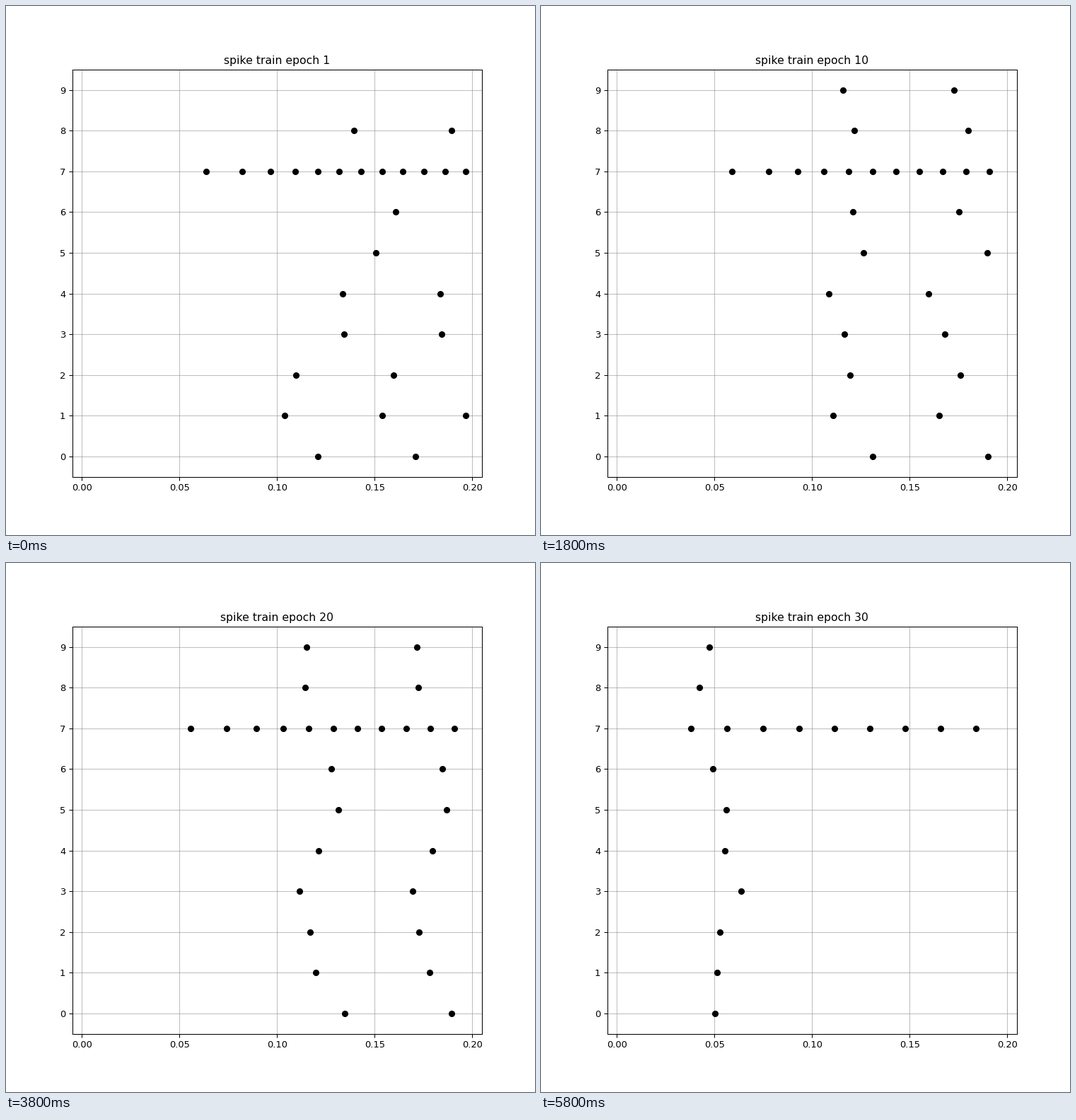
Recreate the animation shown at these times as a matplotlib script. Size 748x748 px, loop 6000 ms.

```python
import numpy as np
import matplotlib.pyplot as plt
from matplotlib.animation import FuncAnimation

EPOCHS = 30
T_MAX = 200  # end of the simulated window, ms
ROWS = np.array([0, 1, 2, 3, 4, 5, 6, 8, 9])
BURST_ROW = 7

# Phases of learning: settle quickly, drift, collapse, drift.
KEYS = [1, 7, 22, 26, 30]
START = [63.5, 59.5, 55.4, 39.8, 37.8]
PITCH = [10.75, 11.9, 12.4, 16.1, 18.1]
LAG = [15, 12.4, 11.4, 1.8, 1.2]
GAP = [50, 57, 57, 160, 160]
SPREAD = [0, 7, 7, 2, 3]

# First spikes of the quiet neurons, in ms, per phase.
OPENING = np.array([121, 104, 109.6, 134.3, 133.4, 150.6, 160.7, 139.4, 205])
MIDDLE = np.full(len(ROWS), 121)
CLOSING = np.array([50.5, 54.5, 51, 64, 54.5, 56.5, 51.5, 45, 48])
FIRST = [OPENING, MIDDLE, MIDDLE, CLOSING, CLOSING]

rng = np.random.default_rng(7)
jitter = rng.normal(size=(EPOCHS, 2, len(ROWS))).clip(-2, 2)


def eased(values, epoch):
    k = min(np.searchsorted(KEYS, epoch, side="right"), len(KEYS) - 1)
    u = (epoch - KEYS[k - 1]) / (KEYS[k] - KEYS[k - 1])
    return values[k - 1] + (values[k] - values[k - 1]) * u * u * (3 - 2 * u)


def burst(epoch):
    """Intervals shrink from the first one towards a steady pitch."""
    i = np.arange(14)
    lag = eased(LAG, epoch) * (1 - np.exp(-i / 1.3))
    return eased(START, epoch) + eased(PITCH, epoch) * i + lag


def quiet(epoch):
    """Up to three spikes per neuron; the second interval is shorter."""
    shift, stretch = jitter[epoch - 1] * eased(SPREAD, epoch)
    first = eased(FIRST, epoch) + shift
    gap = eased(GAP, epoch) + 0.7 * stretch
    return np.concatenate([first + gap * k for k in (0, 1, 1.85)])


def spikes(epoch):
    run, others = burst(epoch), quiet(epoch)
    t = np.concatenate([run, others])
    row = np.concatenate([np.full(len(run), BURST_ROW), np.tile(ROWS, 3)])
    seen = t < T_MAX
    return t[seen] / 1000, row[seen]


fig, ax = plt.subplots(figsize=(8, 8), dpi=93.5)
ax.set_xlim(-0.005, 0.205)
ax.set_ylim(-0.5, 9.5)
ax.set_xticks(np.arange(5) * 0.05)
ax.set_yticks(range(10))
ax.xaxis.set_major_formatter("{x:.2f}")
ax.grid(color="gray", alpha=0.5)
dots, = ax.plot([], [], "o", color="black", markersize=6)
title = ax.set_title("")


def update(i):
    epoch = i + 1
    dots.set_data(*spikes(epoch))
    title.set_text(f"spike train epoch {epoch}")
    return dots, title


anim = FuncAnimation(fig, update, frames=EPOCHS, interval=200, repeat=True)
plt.show()
```
